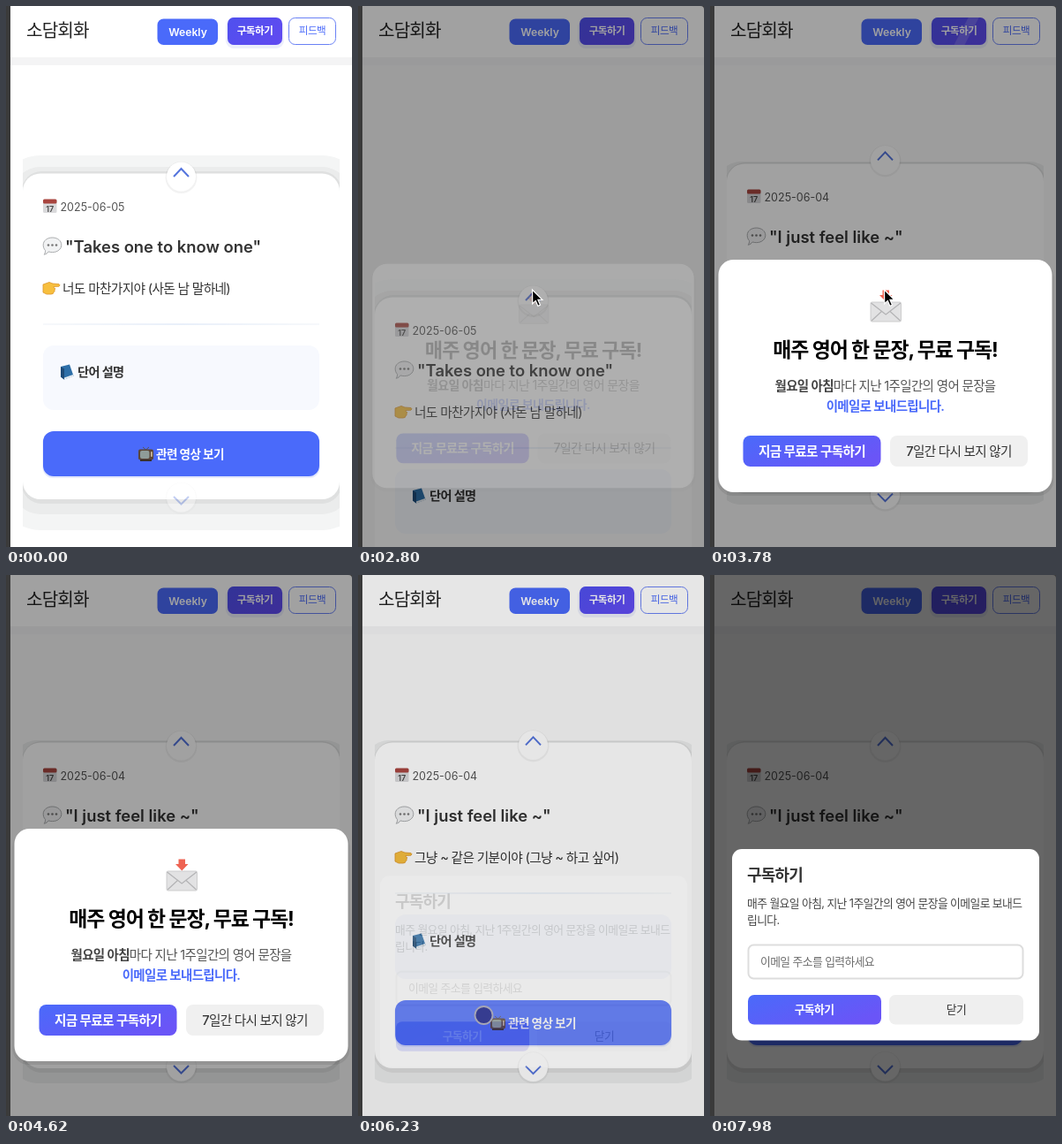
An HTML page that plays this animation: 392x612 px, repeating every 8 s.

```html
<!DOCTYPE html>
<html lang="ko">
<head>
<meta charset="utf-8">
<title>Daily phrase cards</title>
<style>
  html, body { margin: 0; width: 100%; height: 100%; overflow: hidden; background: #fff; }
  svg { display: block; width: 392px; height: 612px; }
  text { font-family: Inter, "Noto Sans CJK KR", "Noto Sans CJK", sans-serif; white-space: pre; }
  .ko { letter-spacing: -.046em; }
  .mid { text-anchor: middle; }
</style>
</head>
<body>
<svg id="stage" viewBox="0 0 392 612"></svg>
<script>
const LOOP = 8000;
const BLUE = '#4a6afa';
const stage = document.getElementById('stage');

const rect = (x, y, w, h, r, fill, extra = '') =>
  `<rect x="${x}" y="${y}" width="${w}" height="${h}" rx="${r}" fill="${fill}" ${extra}/>`;
const path = (d, fill, extra = '') => `<path d="${d}" fill="${fill}" ${extra}/>`;
const label = (x, y, size, weight, fill, str, cls = 'ko') =>
  `<text x="${x}" y="${y}" font-size="${size}" font-weight="${weight}" fill="${fill}" class="${cls}">${str}</text>`;
const centred = (x, y, size, weight, fill, str) => label(x, y, size, weight, fill, str, 'ko mid');

const calendarIcon =
  rect(42, 219, 15.5, 15, 1.5, '#d9d9db') + rect(42, 218.5, 15.5, 5, 1.5, '#a8453f') +
  label(49.8, 232.5, 9, 600, '#444', '17', 'mid');
const bubbleIcon =
  path('M52.5 262c6 0 10.3 3.6 10.3 8.3s-4.3 8.3-10.3 8.3c-1.6 0-3-.2-4.3-.7-1.3 1.8-3 3-5 3.3 1-1.3 1.5-3 1.3-4.7-1.5-1.6-2.3-3.7-2.3-6.2 0-4.7 4.3-8.3 10.3-8.3z',
    '#f1f2f3', 'stroke="#a9abad"') +
  [48, 52.5, 57].map(x => `<circle cx="${x}" cy="270.5" r="1.3" fill="#777"/>`).join('');
const handIcon =
  path('M42 315l7-2.500 4 1.500 7 .5q2 1.300 0 2.700l-6 .3v1q3 1 1 2.700 1 1.500-1 2.500 0 2.300-3 2.300h-5l-4-2z',
    '#f7bf3e', 'stroke="#dd962c" stroke-width=".8"');
const bookIcon =
  path('M62 408l10-2.500 4.500 13-10.500 4-4-3z', '#2d6fa8') +
  path('M66 420.500l10-3.500v2l-10 3.500z', '#e8edf2') +
  path('M62 408l4 2.500v12l-4-3z', '#1d4b78');
const tvIcon =
  path('M155 499l3.500 3 3.500-3', 'none', 'stroke="#555"') +
  rect(150, 501.5, 17, 12, 2, '#5b4638') + rect(152, 503, 10.5, 9, 2, '#8f9c98') +
  rect(164, 504, 1.8, 6, .8, '#c9b89a') + rect(152, 513, 13, 2, 0, '#3a302a');
const envelopeIcon =
  rect(182, 335, 34.5, 22, 1.5, '#e2e2e3', 'stroke="#c4c4c6" stroke-width=".8"') +
  path('M183 356l12-11M215.500 356l-12-11M182.500 336l16.700 13 16.700-13', 'none', 'stroke="#b3b3b5" stroke-width="1.2"') +
  path('M195.500 321.500h7.500v5.500h3.500l-7.200 7.500-7.300-7.500h3.500z', '#ee6352');

function roundButton(cls, cy, chevron, opacity) {
  return `<g class="${cls}" opacity="${opacity}">
    <circle cx="198.5" cy="${cy + 1}" r="18" fill="#000" opacity=".05"/>
    <circle cx="198.5" cy="${cy}" r="16.5" fill="#fff"/>
    ${path(chevron, 'none', 'stroke="#5575dd" stroke-width="2"')}</g>`;
}

function card(id, date, phrase, meaning, isLatest) {
  const shadow = isLatest
    ? rect(-9, 169, 415, 424, 48, '#f4f5f5') + rect(7, 182, 383, 393, 32, '#ebecec') + rect(18, 187, 362, 376, 22, '#dfe0e0')
    : rect(7, 187, 383, 388, 28, '#eaebeb') + rect(18, 188, 362, 375, 22, '#dcdddd');
  return `<g id="${id}">${shadow}${rect(19, 189.5, 359, 368.5, 20, '#fff')}
    ${calendarIcon}${label(61.5, 231.5, 12.5, 400, '#555', date, '')}
    ${bubbleIcon}${label(67, 279, 18.4, 600, '#333', `"${phrase}"`, '')}
    ${handIcon}${label(64, 324.5, 14.7, 400, '#333', meaning)}
    ${rect(42, 359.5, 313, 1, 0, 'url(#rule)')}
    ${rect(42, 384, 313, 73, 12, '#f7f9fe')}${bookIcon}${label(81, 419, 14.2, 600, '#333', '단어 설명')}
    ${rect(41.5, 482, 314, 52, 12, '#e3e8fb')}${rect(42, 481, 313, 51, 12, BLUE)}
    ${tvIcon}${label(170, 512, 13.6, 600, '#fff', '관련 영상 보기')}
    ${roundButton('up', 193, 'M190 193l8.500-9 8.500 9', 1)}
    ${roundButton('down', 556, 'M190 555l8.500 8.500 8.500-8.500', isLatest ? .35 : 1)}</g>`;
}

const header =
  rect(5, 0, 387, 58, 0, '#fff') + label(23, 34.5, 20.2, 500, '#222', '소담회화') +
  rect(171.5, 14.5, 68.5, 29.5, 7, BLUE) + label(206, 34, 12.2, 600, '#fff', 'Weekly', 'mid') +
  rect(249, 15, 66, 33, 9, '#eceefb') + rect(251, 13, 62, 31, 7, 'url(#indigo)') +
  `<g clip-path="url(#pill)">${path('M-3 48L17 10h12L9 48z', '#fff', 'id="shine" opacity=".16"')}</g>` +
  centred(282, 32, 11.6, 700, '#fff', '구독하기') +
  rect(320.5, 13.5, 53, 30, 7, '#fff', 'stroke="#6a82f5"') +
  centred(347, 32, 11.6, 500, BLUE, '피드백');

const offerDialog =
  rect(7.5, 289, 382, 265, 18, '#000', 'opacity=".08"') + rect(9.5, 287, 378, 263, 17, '#fff') + envelopeIcon +
  centred(198.5, 396.5, 22.9, 700, '#000', '매주 영어 한 문장, 무료 구독!') +
  centred(198.5, 434.5, 14.5, 400, '#555',
    '<tspan font-weight="600" fill="#444">월요일 아침</tspan>마다 지난 1주일간의 영어 문장을') +
  centred(198.5, 457.5, 14.5, 600, BLUE, '이메일로 보내드립니다.') +
  rect(37.5, 486, 156, 35, 8, 'url(#accent)') + centred(115.5, 508.5, 14.6, 600, '#fff', '지금 무료로 구독하기') +
  rect(204, 486, 156, 35, 8, '#f0f0f0') + centred(282, 508.5, 14.6, 500, '#333', '7일간 다시 보지 않기');

const signupDialog =
  rect(25, 310, 348, 216.5, 11, '#fff') + label(42, 345.5, 18, 600, '#333', '구독하기') +
  label(42, 376, 12.8, 400, '#444', '매주 월요일 아침, 지난 1주일간의 영어 문장을 이메일로 보내드') +
  label(42, 395, 12.8, 400, '#444', '립니다.') +
  rect(43.5, 418.5, 311, 38, 6, '#fff', 'stroke="#ddd" stroke-width="2"') +
  label(57, 441.5, 12.8, 400, '#6c6c6c', '이메일 주소를 입력하세요') +
  rect(43, 475, 151, 33.5, 7, 'url(#accent)') + centred(118, 496, 12.8, 600, '#fff', '구독하기') +
  rect(203, 475, 152, 33.5, 7, '#efefef') + centred(279, 496, 12.8, 500, '#333', '닫기');

stage.innerHTML = `
  <defs>
    <linearGradient id="accent" x2="1" y2=".6"><stop stop-color="${BLUE}"/><stop offset="1" stop-color="#6a55f7"/></linearGradient>
    <linearGradient id="indigo" x2="1" y2=".6"><stop stop-color="#4f50ee"/><stop offset="1" stop-color="#5f4bf0"/></linearGradient>
    <linearGradient id="rule"><stop stop-color="#eef2f8"/><stop offset=".5" stop-color="#d3e0f4"/><stop offset="1" stop-color="#eef2f8"/></linearGradient>
    <clipPath id="pill">${rect(251, 13, 62, 31, 7, '#000')}</clipPath>
    <clipPath id="deck">${rect(19, 58, 359, 554, 0, '#000')}</clipPath>
  </defs>
  ${rect(5, 0, 387, 612, 0, '#fff', 'id="page"')}
  ${rect(5, 58, 387, 9, 0, '#f4f4f5')}
  <g clip-path="url(#deck)">
    ${card('latest', '2025-06-05', 'Takes one to know one', '너도 마찬가지야 (사돈 남 말하네)', true)}
    ${card('previous', '2025-06-04', 'I just feel like ~', '그냥 ~ 같은 기분이야 (그냥 ~ 하고 싶어)', false)}
  </g>
  ${header}
  ${rect(5, 0, 387, 612, 0, '#000', 'id="shade"')}
  <g id="offer">${offerDialog}</g>
  <g id="signup">${signupDialog}</g>
  ${rect(0, 0, 5, 612, 0, '#3a3a3a')}
  ${path('M388 0h4v4q0-4-4-4z', '#3a3a3a')}
  ${path('M0 0l.2 15.800 3.600-3.400 2.600 6 2.600-1.100-2.600-5.900h5z', '#000', 'id="arrow" stroke="#fff" stroke-width="1.2"')}
  <circle id="touch" cx="142.5" cy="498" r="10" fill="#2f3180" fill-opacity=".85" stroke="#a5a5b5" stroke-width="1.8"/>`;

const el = Object.fromEntries([...stage.querySelectorAll('[id]')].map(node => [node.id, node]));
const ups = stage.querySelectorAll('.up');
const downs = stage.querySelectorAll('.down');

const progress = (t, from, to) => Math.min(1, Math.max(0, (t - from) / (to - from)));
const easeOut = u => 1 - (1 - u) ** 2;
const smooth = u => u * u * (3 - 2 * u);
const shift = (node, x, y) => node.setAttribute('transform', `translate(${x} ${y})`);
const fade = (node, opacity) => {
  node.setAttribute('opacity', opacity);
  node.setAttribute('visibility', opacity > 0 ? 'visible' : 'hidden');
};

function render(t) {
  // Chevron buttons hop away from the card once per cycle.
  const beat = (t + 1800) % 2660;
  const hop = 8 * smooth(progress(beat, 0, 300)) * (1 - smooth(progress(beat, 320, 800)));
  ups.forEach(node => shift(node, 0, -hop));
  downs.forEach(node => shift(node, 0, hop));

  const gleam = progress(t % 3300, 300, 600);
  shift(el.shine, 220 + 95 * gleam, 0);

  // Swipe to the earlier card, then one small nudge.
  const drag = 140 * smooth(progress(t, 2520, 2740));
  const exit = 460 * progress(t, 2810, 2980) ** 2;
  const enter = easeOut(progress(t, 2940, 3150));
  const nudge = 11 * Math.sin(Math.PI * progress(t, 3400, 4130));
  shift(el.latest, 0, drag + exit);
  shift(el.previous, 0, -560 * (1 - enter) - nudge);
  fade(el.latest, t < 2980 ? 1 : 0);
  fade(el.previous, t >= 2940 ? 1 : 0);

  const offerIn = progress(t, 2740, 3150);
  const offerOut = progress(t, 5860, 6090);
  const scale = .95 + .05 * easeOut(offerIn);
  fade(el.offer, offerIn * (1 - offerOut));
  el.offer.setAttribute('transform', `translate(198.5 418.5) scale(${scale}) translate(-198.5 -418.5)`);

  const signupIn = easeOut(progress(t, 6200, 6570));
  fade(el.signup, signupIn);
  shift(el.signup, 0, 36 * (1 - signupIn));

  const offerShade = .37 * progress(t, 2560, 2730) * (1 - offerOut);
  fade(el.shade, Math.max(offerShade, .6 * signupIn));
  el.page.setAttribute('fill', t < 2590 ? '#fff' : '#f8f8f8');

  shift(el.arrow, 197.5, 183 + 138 * smooth(progress(t, 2350, 2520)));
  fade(el.arrow, t >= 2300 && t < 4260 ? 1 : 0);
  fade(el.touch, t >= 5740 && t < 6760 ? 1 : 0);
}

const start = performance.now();
function tick() {
  render((performance.now() - start) % LOOP);
  requestAnimationFrame(tick);
}
tick();
</script>
</body>
</html>
```
